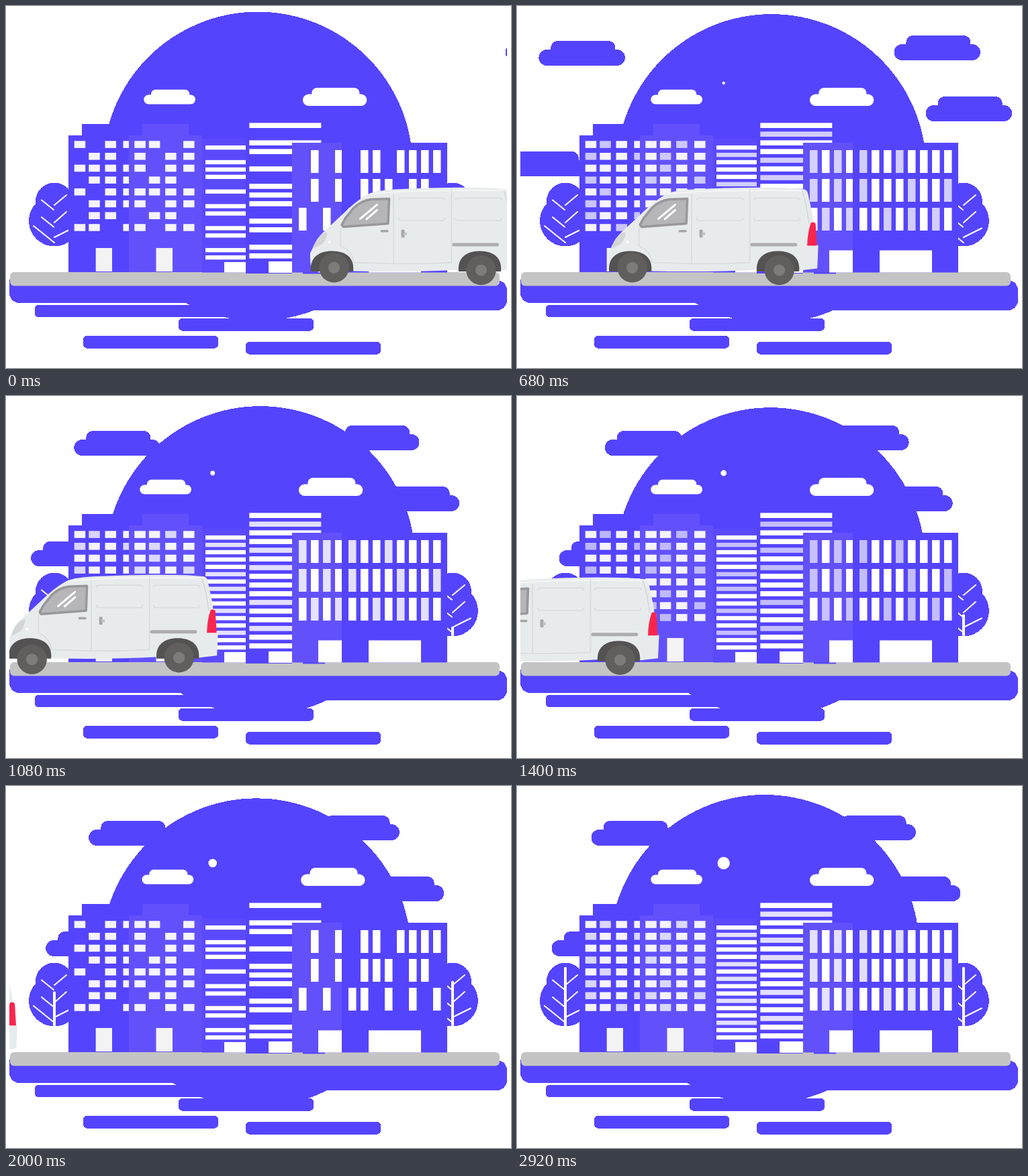
Recreate the animation shown at these times as an HTML page. Size 752 px wide and 540 px high, loop 2.96 s.

```html
<!DOCTYPE html>
<html lang="en">
<head>
<meta charset="utf-8">
<title>Van in the city</title>
<style>
  html, body { margin: 0; width: 100%; height: 100%; overflow: hidden; background: #fff; }
  svg { display: block; width: 752px; height: 540px; }
</style>
</head>
<body>
<svg id="stage" viewBox="0 0 752 540" xmlns="http://www.w3.org/2000/svg"></svg>
<script>
const LOOP = 2960, STEP = 40;
const MAIN = '#5544fd', LIGHT = '#6251fb', MID = '#5b4afc';

const rect = (x, y, x2, y2, fill, r = 0, extra = '') =>
  `<rect x="${x}" y="${y}" width="${x2 - x}" height="${y2 - y}" rx="${r}" fill="${fill}" ${extra}/>`;
const path = (d, fill, extra = '') => `<path d="${d}" fill="${fill}" ${extra}/>`;
const line = (d, color, width) =>
  path(d, 'none', `stroke="${color}" stroke-width="${width}" stroke-linecap="round"`);
const circle = (x, y, r, fill, id = '') => `<circle id="${id}" cx="${x}" cy="${y}" r="${r}" fill="${fill}"/>`;
const group = (id, body) => `<g id="${id}">${body}</g>`;
const crisp = (body) => `<g shape-rendering="crispEdges">${body}</g>`;

// Scenery
const cloud = (id, y) => group(id,
  rect(0, y + 13, 128.5, y + 37, MAIN, 12) + rect(18, y, 114, y + 26, MAIN, 10));

const whiteCloud = (x, y, w, h) =>
  rect(x, y, x + w, y + h, '#fff', h / 2) + rect(x + w * .14, y - h * .55, x + w * .885, y + h / 2, '#fff', h * .45);

const tree = (id, dx) => `<g transform="translate(${dx} 0)">` +
  crisp(circle(72, 291.5, 28, MAIN) + circle(72, 320.5, 38, MAIN)) +
  line('M53 289.5L71 304M72 297L90 282M53 315L71 329.5M72 323L90 307M41 328L72 353M72 345L99 331.5', '#fff', 2) +
  rect(70, 358, 74, 358, '#fff', 1.5, `id="${id}"`) + '</g>';

// Windows: one word per row, "o" blinks and "." stays lit
function windows(rows, x, y, w, h, dx, dy, spread = 0, fill = '#fff') {
  return rows.split(' ').map((row, r) => [...row].map((mark, c) => {
    const left = x + c * (dx + spread * c), top = y + r * dy;
    return rect(left, top, left + w, top + h, fill, 0, mark === 'o' ? 'class="blink"' : '');
  }).join('')).join('');
}

const stripes = (marks, x, y, w, h, dy) => windows([...marks].join(' '), x, y, w, h, 0, dy);

const wing = (x, color, rows) =>
  rect(x + 20, 176, x + 110, 194, color) + rect(x, 193, x + 100, 397, color) +
  windows(rows, x + 8.7, 201.3, 16.5, 10.5, 20.2, 17.7, 1.35, '#f5f4fb') +
  rect(x + 40.7, 361, x + 65, 396, '#f3f3f3');

const flats =
  wing(93, MAIN, '.o.. o..o .... o... .o.. o... o..o ..o.') +
  `<clipPath id="wing"><rect x="183" y="170" width="109" height="228"/></clipPath>` +
  rect(183, 193, 292, 397, LIGHT) + rect(203, 176, 272, 194, LIGHT) +
  windows('..o. .o.. .o.. o..o .... .o.. o..o .o..', 191.3, 201.3, 16.5, 10.5, 20.2, 17.7, 1.35, '#f5f4fb') +
  rect(223.5, 361, 248, 396, '#f3f3f3');

const towers =
  rect(292, 198, 357, 397.5, MID) + stripes('.o...o.o..o..o..', 297, 208, 60, 6.3, 10.93) +
  rect(325, 382, 357, 397.5, '#fff') +
  rect(357, 182, 426, 399, MAIN) + stripes('.o..o.o...o..o..', 362.3, 174.4, 107, 7.6, 12.97) +
  rect(391, 381, 426, 398, '#fff');

const office =
  rect(426, 204, 500, 397.5, LIGHT) + windows('o.o. o.o. .o.o', 436, 215, 11.5, 34, 18, 43) +
  rect(500, 204, 657, 397.5, MAIN) + windows('o..o.... o...o..o ..o.o.o.', 510, 215, 11.5, 34, 18, 43) +
  rect(442, 397, 475, 399.5, MAIN) +
  rect(465, 364.5, 500, 397.5, '#fff') + rect(540, 364.5, 618, 397.5, '#fff');

const bar = (x, y) => rect(x, y, x + 201, y + 18.5, MAIN, 5.5);
const ground =
  crisp(rect(5, 397, 390, 443, MAIN, 15) + rect(370, 409, 746, 454, MAIN, 15) +
    rect(43, 446, 335, 464, MAIN, 5) + bar(257, 466) + bar(115, 492) + bar(357, 501)) +
  rect(6, 397, 735, 417.5, '#c4c4c4', 6);

// Van
const panel = (x) => line(
  `M${x} 285q0 -3 4 -3h61q4 0 4 3M${x} 312q0 3.5 4 3.5h61q4 0 4 -3.5`, '#d9dbdc', 1.5);
const wheel = (id, x) => group(id, circle(x, 0, 22.2, '#615e5e') + circle(x, 0, 8.6, '#7e7b7b'));
const arch = (x) => path(`M${x - 31.5} 391.5c-2 -19 10 -30.5 31.5 -30.5s33.500 11 31.500 30.500z`, '#545252');

const body =
  path('M256 391Q253 382 253.500 364L257 357Q263 342 274 332L304 304Q322 286 340 276Q352 270.500 380 269' +
    'Q450 265 520 267L545 269Q550 270 551 277L558 310L562 350L566 353L564.500 387L538 390L475 389' +
    'Q400 393 318 391Z', '#e8ebec') +
  line('M343 276Q400 269 545 271', '#f5f6f6', 2) +
  line('M377.5 276V379M464 270V379M299 326V354Q316 360 318 378L377 380Q440 380 464 378', '#d8dadb', 1.5) +
  line('M542 271Q549 292 552 319', '#cfd0d1', 1.2) +
  panel(385) + panel(470) +
  path('M300.5 322L306 312L318 297Q329 286 344 284L371 283L369.5 320L303 325Z', '#b6b6b8',
    'stroke="#98979b" stroke-width="3.5" stroke-linejoin="round"') +
  line('M328 313L353 292M337.5 313.5L353 300', '#fff', 3) +
  path('M259 355Q263 340 274 334L279 333Q278 345 271 351L260 357Z', '#d4d5d7') +
  circle(282, 347.5, 2, '#fff') +
  rect(358, 329.5, 370, 333, '#a5a5a6', 1.5) +
  rect(389, 329, 394, 341, '#a9a9aa', 1.5) + rect(393, 333, 397.5, 337.5, '#c5c5c6', 1) +
  rect(465, 349, 534.5, 354, '#adadae', 2) +
  path('M555 319Q559 317 562 320L564 353H549.5Q550 333 555 319Z', '#f8264e') +
  arch(286) + arch(506);

document.getElementById('stage').innerHTML =
  '<clipPath id="frame"><rect x="5" y="0" width="741" height="540"/></clipPath><g clip-path="url(#frame)">' +
  crisp(circle(0, 0, 230.5, MAIN, 'sun') +
    cloud('cloudA', 52) + cloud('cloudB', 217) + cloud('cloudC', 44) + cloud('cloudD', 135)) +
  group('whiteClouds', whiteCloud(199.3, 132.5, 76.7, 14) + whiteCloud(436, 131.5, 95.3, 17.500)) +
  circle(307.7, 115, 0, '#fff', 'moon') +
  tree('trunkA', 0) + tree('trunkB', 593) + ground + flats + towers + office +
  group('van', group('body', body) + wheel('front', 289) + wheel('rear', 508)) + '</g>';

// Motion
const TAU = 2 * Math.PI;
const clamp = (v) => Math.max(0, Math.min(1, v));
const $ = (id) => document.getElementById(id);
const blinks = document.querySelectorAll('.blink');
const move = (id, x, y = 0) => $(id).setAttribute('transform', `translate(${x.toFixed(2)} ${y.toFixed(2)})`);

// Glides in past its resting place, then settles back
function drift(now, from, peak, rest) {
  if (now < 1600) return from + (peak - from) * Math.sin(TAU / 4 * now / 1600);
  const s = clamp((now - 1600) / 800);
  return peak + (rest - peak) * s * s * (3 - 2 * s);
}

function grow(id, now, start) {
  const h = 88 * clamp((now - start) / 1520);
  $(id).setAttribute('y', 358 - h);
  $(id).setAttribute('height', h);
}

function draw(now) {
  const turn = TAU * (now - 860) / 4000;
  move('sun', 373.9 + 5.2 * Math.cos(turn), 244 + 5 * Math.sin(turn));
  $('moon').setAttribute('r', 9.2 * now / 2920);

  move('cloudA', drift(now, -136, 136, 110.5));
  move('cloudB', drift(now, -167, 67, 51.5));
  move('cloudC', drift(now, 743.5, 449.5, 465.5));
  move('cloudD', drift(now, 760, 515.5, 532));
  move('whiteClouds', 6 * Math.max(0, Math.cos(TAU * now / 1840)) ** 4);

  const bounce = Math.cos(TAU * now / 680);
  move('van', 99 - .324 * now + 100.5 * Math.exp(-now / 210));
  move('body', 0, 2.2 + 2.2 * bounce);
  move('front', 0, 391.7 - 1.4 * bounce);
  move('rear', 0, 392 + 2 * bounce);

  grow('trunkB', now, 840);
  grow('trunkA', now, 1110);

  const wave = 1 - Math.abs(1 - now % 2000 / 1000);
  const glow = Math.min(.83, 1.08 * wave);
  blinks.forEach((b) => b.setAttribute('opacity', glow));
}

const begin = performance.now();
function tick() {
  const now = (performance.now() - begin) % LOOP;
  draw(Math.floor(now / STEP) * STEP);
  requestAnimationFrame(tick);
}
tick();
</script>
</body>
</html>
```
